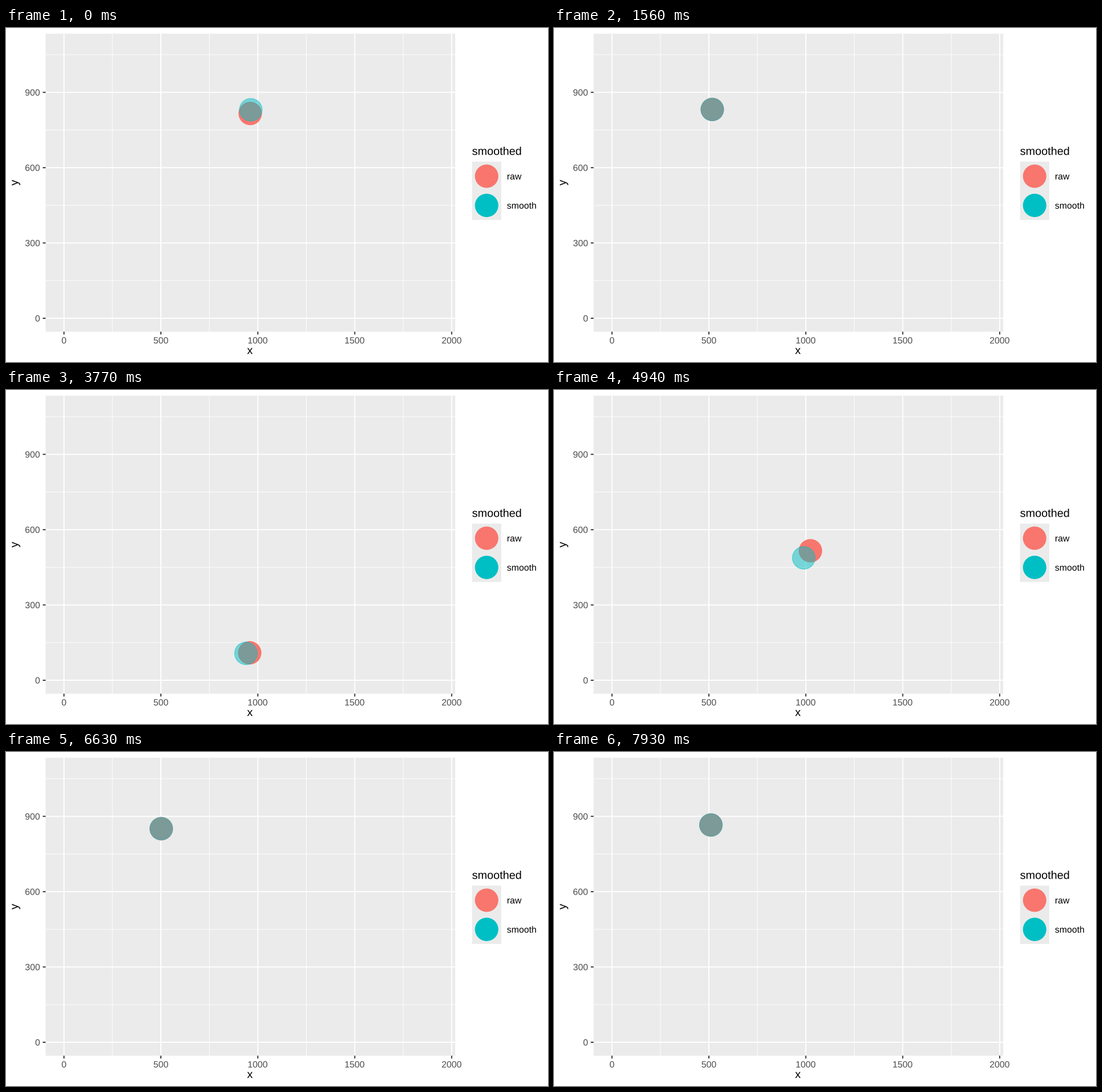
A matplotlib script for the animation above (8 s loop, 952 px wide and 588 px high).

```python
import matplotlib.pyplot as plt
from matplotlib.animation import FuncAnimation
from matplotlib.collections import LineCollection
from matplotlib.patches import Circle, PathPatch, Rectangle
from matplotlib.textpath import TextPath
from matplotlib.transforms import Affine2D

W, H, DPI = 952, 588, 100
PT = 72 / DPI
LOOP_MS, INTERVAL, STEP_MS = 8000, 20, 130
RAW, SMOOTH, PANEL = "#F8766D", "#00BFC4", "#EBEBEB"
LEFT, RIGHT, TOP, BOTTOM = 69.6, 789.0, 10.0, 534.6
LABEL, TITLE = 15.89, 19.86

# Where the gaze rests, with the step at which it arrives
FIXATIONS = [
    (5, 428.9, 150.5), (6, 431, 137.5), (8, 430, 301), (12, 278, 143.4),
    (15, 430, 300), (17, 434, 439), (21, 627, 143), (24, 428, 304),
    (27, 418, 464), (29, 428, 462.7), (30, 415, 464.5), (33, 624, 149),
    (38, 450.4, 283), (39, 427, 308), (40, 429, 300), (44, 272.7, 135),
    (54, 440, 240), (58, 275.6, 128.5),
]

plt.rcParams["font.family"] = "Liberation Sans"
fig = plt.figure(figsize=(W / DPI, H / DPI), dpi=DPI, facecolor="white")
ax = fig.add_axes([0, 0, 1, 1])
ax.set(xlim=(0, W), ylim=(H, 0))
ax.axis("off")


def px(x):
    return 101.8 + 0.3405 * x


def py(y):
    return 511 - 0.4419 * y


def rect(x, y, w, h):
    ax.add_patch(Rectangle((x, y), w, h, fc=PANEL, ec="none", snap=False,
                           zorder=0))


def lines(segments, color, width):
    ax.add_collection(LineCollection(segments, colors=color, snap=False,
                                     linewidths=width * PT, zorder=1,
                                     capstyle="butt"), autolim=False)


def text(x, y, s, size, color="black", align=0, angle=0):
    """Outline text on baseline y; align 0 is left, 0.5 centre, 1 right."""
    path = TextPath((0, 0), s, size=size)
    box = path.get_extents()
    shift = -align * (box.x0 + box.x1)
    place = Affine2D().translate(shift, 0).scale(1, -1)
    place.rotate_deg(-angle).translate(x, y)
    ax.add_patch(PathPatch(place.transform_path(path), fc=color, ec="none",
                           snap=False, zorder=2))


def dot(x, y, color, alpha=1):
    return ax.add_patch(Circle((x, y), 19.9, fc=color, ec=color, alpha=alpha,
                               lw=1.28 * PT, zorder=3))


def grid(xs, ys, width):
    lines([[(px(x), TOP), (px(x), BOTTOM)] for x in xs]
          + [[(LEFT, py(y)), (RIGHT, py(y))] for y in ys], "white", width)


def draw_chart():
    x_ticks, y_ticks = range(0, 2001, 500), range(0, 901, 300)
    rect(LEFT, TOP, RIGHT - LEFT, BOTTOM - TOP)
    grid(range(250, 2000, 500), range(150, 1100, 300), 0.97)
    grid(x_ticks, y_ticks, 1.93)
    lines([[(px(x), BOTTOM), (px(x), BOTTOM + 5)] for x in x_ticks]
          + [[(LEFT - 5, py(y)), (LEFT, py(y))] for y in y_ticks],
          "#333333", 1.93)
    for x in x_ticks:
        text(px(x), 555.4, str(x), LABEL, "#4D4D4D", align=0.5)
    for y in y_ticks:
        text(59.9, py(y) + 5.7, str(y), LABEL, "#4D4D4D", align=1)
    text(428.4, 573.9, "x", TITLE, align=0.5)
    text(20.9, 272.3, "y", TITLE, align=0.5, angle=90)


def draw_legend():
    text(818.6, 223.4, "smoothed", TITLE)
    rect(818.6, 235.3, 51.2, 102.6)
    for y, color, label in ((260.9, RAW, "raw"), (312.3, SMOOTH, "smooth")):
        dot(844.2, y, color)
        text(879.8, y + 5.7, label, LABEL)


def gaze(step):
    """Rest at a fixation, then jump to the next within its last step."""
    _, x, y = FIXATIONS[0]
    for arrival, next_x, next_y in FIXATIONS[1:]:
        part = min(max(step - arrival + 1, 0), 1)
        x += (next_x - x) * part
        y += (next_y - y) * part
    return x, y


draw_chart()
draw_legend()
raw_dot = dot(0, 0, RAW)
smooth_dot = dot(0, 0, SMOOTH, 0.5)


def update(n):
    step = (n * INTERVAL + INTERVAL // 2) // STEP_MS
    step = max(step, FIXATIONS[0][0])
    raw_dot.center = gaze(step)
    # Smoothing looks half a step ahead
    smooth_dot.center = gaze(step + 0.5)
    return raw_dot, smooth_dot


anim = FuncAnimation(fig, update, frames=LOOP_MS // INTERVAL,
                     interval=INTERVAL, repeat=True, repeat_delay=0)
plt.show()
```
